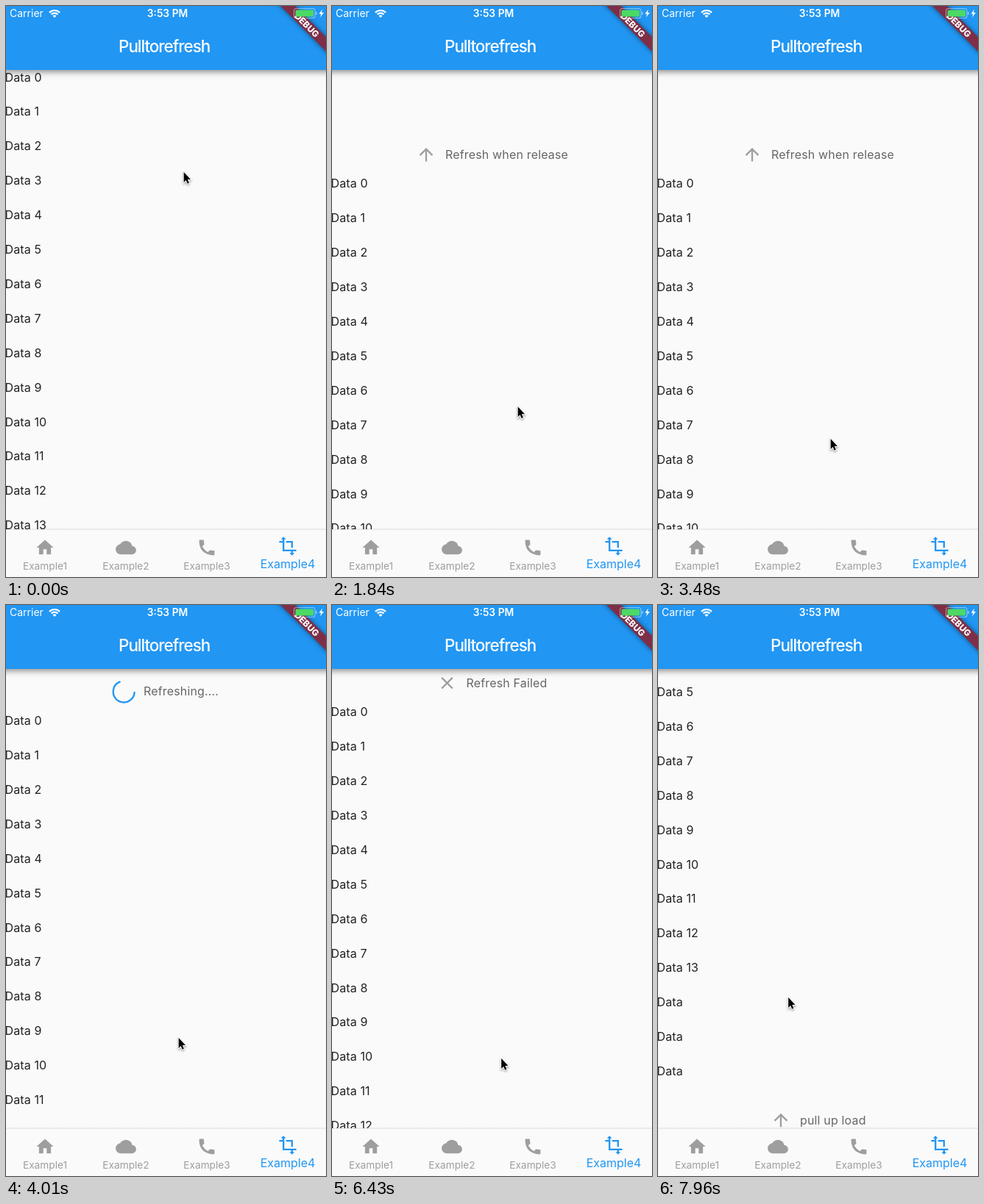
These frames come from a looping animation (435x777 px, 8 s). An HTML page with a canvas:

```html
<!DOCTYPE html>
<html lang="en">
<head>
<meta charset="utf-8">
<title>Pull to refresh</title>
<style>
  html, body { margin: 0; width: 100%; height: 100%; overflow: hidden; background: #fafafa; }
  canvas { display: block; width: 435px; height: 777px; }
</style>
</head>
<body>
<canvas id="stage" width="435" height="777"></canvas>
<script>
const ctx = document.getElementById('stage').getContext('2d');
const W = 435, H = 777, LOOP = 8000;
const LIST_TOP = 87, LIST_BOTTOM = 712, ROW = 46.9, ROWS = 17, NUMBERED = 14;
const BLUE = '#2196f3', GREY = '#9e9e9e', INK = '#222', SOFT = '#666', PAPER = '#fafafa';
const ICON_SCALE = 1.16;
const TRIGGER = 120, REST = 59, PULLED = 145, FLIP_MS = 240;
const RELEASE_AT = 3595, FAILED_AT = 5610, COLLAPSE_AT = 6388, COLLAPSE_MS = 250;

// Smooth progress from 0 to 1 between two times.
function ease(t, from, to) {
  const u = Math.min(1, Math.max(0, (t - from) / (to - from)));
  return u * u * (3 - 2 * u);
}

// Pulling past the edge meets growing resistance.
function pullOffset(t) {
  const drag = 363 * ease(t, 180, 1545) - 123 * ease(t, 1860, 2460) + 123 * ease(t, 2900, 3470);
  return (LIST_BOTTOM - LIST_TOP) * drag / (drag + 1202);
}

function listOffset(t) {
  if (t < RELEASE_AT) return pullOffset(t);
  if (t < COLLAPSE_AT) {
    const k = 14.1 * (t - RELEASE_AT) / 1000;
    return REST + (PULLED - REST) * (1 + k) * Math.exp(-k);
  }
  const collapsed = Math.min(1, (t - COLLAPSE_AT) / COLLAPSE_MS);
  return REST * (1 - collapsed) - 231 * ease(t, 7050, 7610) + 18 * ease(t, 7660, 7940);
}

// Share of the last FLIP_MS spent beyond the trigger: turns the arrow linearly.
function flipProgress(t) {
  const samples = 24;
  let beyond = 0;
  for (let i = 0; i < samples; i++) {
    if (pullOffset(t - i * FLIP_MS / samples) > TRIGGER) beyond++;
  }
  return beyond / samples;
}

function cursorAt(t) {
  const x = 241 + 11 * ease(t, 180, 1260) - 18 * ease(t, 1840, 3480)
    - 4.5 * ease(t, 4300, 4900) - 53 * ease(t, 6800, 7940);
  const y = 226 + 363 * ease(t, 180, 1545) - 123 * ease(t, 1680, 2080) + 123 * ease(t, 2900, 3470)
    + 28 * ease(t, 4300, 4900) + 84 * ease(t, 6800, 7050)
    - 185 * ease(t, 7050, 7610) + 18 * ease(t, 7660, 7940);
  return [x, y];
}

function text(str, x, baseline, size, color, { weight = 400, align = 'left', spacing = 0 } = {}) {
  ctx.font = `${weight} ${size}px Inter, "Liberation Sans", sans-serif`;
  ctx.letterSpacing = spacing + 'px';
  ctx.textAlign = align;
  ctx.fillStyle = color;
  ctx.fillText(str, x, baseline);
}

const fillPath = d => ctx.fill(new Path2D(d));
const strokePath = d => ctx.stroke(new Path2D(d));

function disc(x, y, r) {
  ctx.beginPath();
  ctx.arc(x, y, r, 0, 2 * Math.PI);
  ctx.fill();
}

// Icons live on a 24 unit grid.
const icons = {
  home: () => fillPath('M10 20V14H14V20H19V12H22L12 3 2 12H5V20Z'),
  cloud() {
    disc(6, 14, 6);
    disc(12, 11.5, 7.5);
    disc(19, 15, 5);
    ctx.fillRect(6, 12, 13, 8);
  },
  phone: () => fillPath('M3 4Q3 3 4 3H8.3L9 8.4 6.6 10.8Q9 15 13.2 17.4L15.6 15 21 15.7V20Q21 21 20 21Q3 20 3 4Z'),
  crop() {
    strokePath('M7 3V17H22M2 7H6M10 7H17V14M17 17V21');
    fillPath('M7 1L10 4H4ZM17 23L20 20H14Z');
  },
  arrow: () => strokePath('M12 20V5.4M4.7 12.7L12 5.4 19.3 12.7'),
  close: () => strokePath('M5.7 5.7L18.3 18.3M18.3 5.7L5.7 18.3')
};

function icon(name, x, y, color, angle = 0) {
  ctx.save();
  ctx.translate(x, y);
  ctx.rotate(angle);
  ctx.scale(ICON_SCALE, ICON_SCALE);
  ctx.translate(-12, -12);
  ctx.fillStyle = ctx.strokeStyle = color;
  ctx.lineWidth = 2;
  icons[name]();
  ctx.restore();
}

function label(str, x, y) {
  text(str, x, y + 5.5, 16, SOFT, { spacing: 0.16 });
}

function labelRow(iconName, str, x, y, angle) {
  icon(iconName, x, y, GREY, angle);
  label(str, x + 26, y);
}

// Cubic bezier (0.4, 0, 0.2, 1) solved by bisection.
function fastOutSlowIn(x) {
  if (x <= 0 || x >= 1) return x <= 0 ? 0 : 1;
  let lo = 0, hi = 1, u = 0.5;
  for (let i = 0; i < 20; i++) {
    u = (lo + hi) / 2;
    const bx = 1.2 * u * (1 - u) ** 2 + 0.6 * u * u * (1 - u) + u ** 3;
    if (bx < x) lo = u; else hi = u;
  }
  return 3 * u * u - 2 * u ** 3;
}

function spinner(x, y, ms) {
  const cycles = ms / 1333, step = Math.floor(cycles), turn = cycles - step;
  const head = fastOutSlowIn(turn * 2), tail = fastOutSlowIn(turn * 2 - 1);
  const start = Math.PI * (-0.5 + tail * 1.5 + turn * 1.7 - step * 0.8);
  const sweep = Math.max((head - tail) * 1.5 * Math.PI, 0.001);
  ctx.beginPath();
  ctx.arc(x, y, 14.5, start, start + sweep);
  ctx.strokeStyle = BLUE;
  ctx.lineWidth = 2.3;
  ctx.lineCap = 'square';
  ctx.stroke();
  ctx.lineCap = 'butt';
}

function drawHeader(t, y, offset) {
  if (t >= FAILED_AT) return labelRow('close', 'Refresh Failed', 156.5, y);
  if (t >= RELEASE_AT) {
    spinner(160.2, y, t - RELEASE_AT);
    return label('Refreshing....', 187, y);
  }
  const angle = Math.PI * (1 + flipProgress(t));
  if (offset > TRIGGER) labelRow('arrow', 'Refresh when release', 128, y, angle);
  else labelRow('arrow', 'pull down refresh', 144.5, y, angle);
}

function drawList(t) {
  const offset = listOffset(t);
  ctx.save();
  ctx.beginPath();
  ctx.rect(0, LIST_TOP, W, LIST_BOTTOM - LIST_TOP);
  ctx.clip();
  if (offset > 0) drawHeader(t, 57.3 + offset, offset);
  for (let i = 0; i < ROWS; i++) {
    const str = i < NUMBERED ? `Data ${i}` : 'Data';
    text(str, -1.5, 102.5 + offset + i * ROW, 16, INK, { spacing: 0.12 });
  }
  labelRow('arrow', 'pull up load', 167, 914 + offset);
  ctx.restore();
}

function drawWifi(x, y) {
  const from = -Math.PI * 0.75, to = -Math.PI * 0.25;
  ctx.strokeStyle = ctx.fillStyle = '#fff';
  ctx.lineWidth = 2.2;
  for (const r of [6.3, 10]) {
    ctx.beginPath();
    ctx.arc(x, y, r, from, to);
    ctx.stroke();
  }
  ctx.beginPath();
  ctx.moveTo(x, y);
  ctx.arc(x, y, 3.6, from, to);
  ctx.fill();
}

function drawBanner() {
  ctx.save();
  ctx.translate(W, 0);
  ctx.rotate(Math.PI / 4);
  ctx.shadowColor = 'rgba(0,0,0,.5)';
  ctx.shadowBlur = 7;
  ctx.fillStyle = '#7e2f47';
  ctx.fillRect(-60, 29.7, 120, 14);
  ctx.shadowColor = 'transparent';
  text('DEBUG', 0, 41, 11.8, '#fff', { weight: 800, align: 'center' });
  ctx.restore();
}

function drawBattery() {
  ctx.strokeStyle = 'rgba(255,255,255,.45)';
  ctx.lineWidth = 1.1;
  ctx.beginPath();
  ctx.roundRect(391.5, 3.5, 28.5, 13, 3);
  ctx.stroke();
  ctx.fillStyle = '#4cd964';
  ctx.beginPath();
  ctx.roundRect(393.5, 5.5, 24.5, 9, 1.5);
  ctx.fill();
  ctx.fillStyle = 'rgba(255,255,255,.5)';
  ctx.fillRect(421, 8, 1.5, 4);
  ctx.fillStyle = '#fff';
  fillPath('M430 4.5L425.5 10.8H428.3L427 15.5 432 9H429Z');
}

function drawAppBar() {
  ctx.save();
  ctx.shadowColor = 'rgba(0,0,0,.42)';
  ctx.shadowBlur = 8;
  ctx.shadowOffsetY = 2.5;
  ctx.fillStyle = BLUE;
  ctx.fillRect(-20, -20, W + 40, LIST_TOP + 20);
  ctx.restore();
  text('Carrier', 5, 15, 14, '#fff');
  drawWifi(66, 16);
  text('3:53 PM', 219.5, 15, 13.8, '#fff', { weight: 600, align: 'center' });
  text('Pulltorefresh', 153, 62.5, 22.5, '#fff', { weight: 500, spacing: -1.05 });
  drawBanner();
  drawBattery();
}

function drawTabs() {
  const edge = ctx.createLinearGradient(0, LIST_BOTTOM - 2, 0, LIST_BOTTOM + 1);
  edge.addColorStop(0, 'rgba(0,0,0,0)');
  edge.addColorStop(1, 'rgba(0,0,0,.09)');
  ctx.fillStyle = edge;
  ctx.fillRect(0, LIST_BOTTOM - 2, W, 3);
  ctx.fillStyle = PAPER;
  ctx.fillRect(0, LIST_BOTTOM + 1, W, H - LIST_BOTTOM - 1);
  ['home', 'cloud', 'phone', 'crop'].forEach((name, i) => {
    const active = i === 3, x = 53 + i * 110, color = active ? BLUE : GREY;
    icon(name, x, active ? 735 : 737, color);
    text(`Example${i + 1}`, x, active ? 765 : 766.5, active ? 16 : 13.7, color, { align: 'center' });
  });
}

function drawCursor(t) {
  const pointer = new Path2D('M0 0V15.6L3.6 12.2 6.1 17.6 8.6 16.5 6.2 11.2H11.2Z');
  const [x, y] = cursorAt(t);
  ctx.save();
  ctx.translate(x + 0.7, y);
  ctx.scale(0.83, 0.9);
  ctx.shadowColor = 'rgba(0,0,0,.4)';
  ctx.shadowBlur = 3;
  ctx.shadowOffsetY = 1.5;
  ctx.strokeStyle = '#fff';
  ctx.lineWidth = 2;
  ctx.stroke(pointer);
  ctx.shadowColor = 'transparent';
  ctx.fillStyle = '#000';
  ctx.fill(pointer);
  ctx.restore();
}

function draw(t) {
  ctx.fillStyle = PAPER;
  ctx.fillRect(0, 0, W, H);
  drawList(t);
  drawAppBar();
  drawTabs();
  drawCursor(t);
}

const startTime = performance.now();
function tick() {
  draw((performance.now() - startTime) % LOOP);
  requestAnimationFrame(tick);
}
tick();
</script>
</body>
</html>
```
